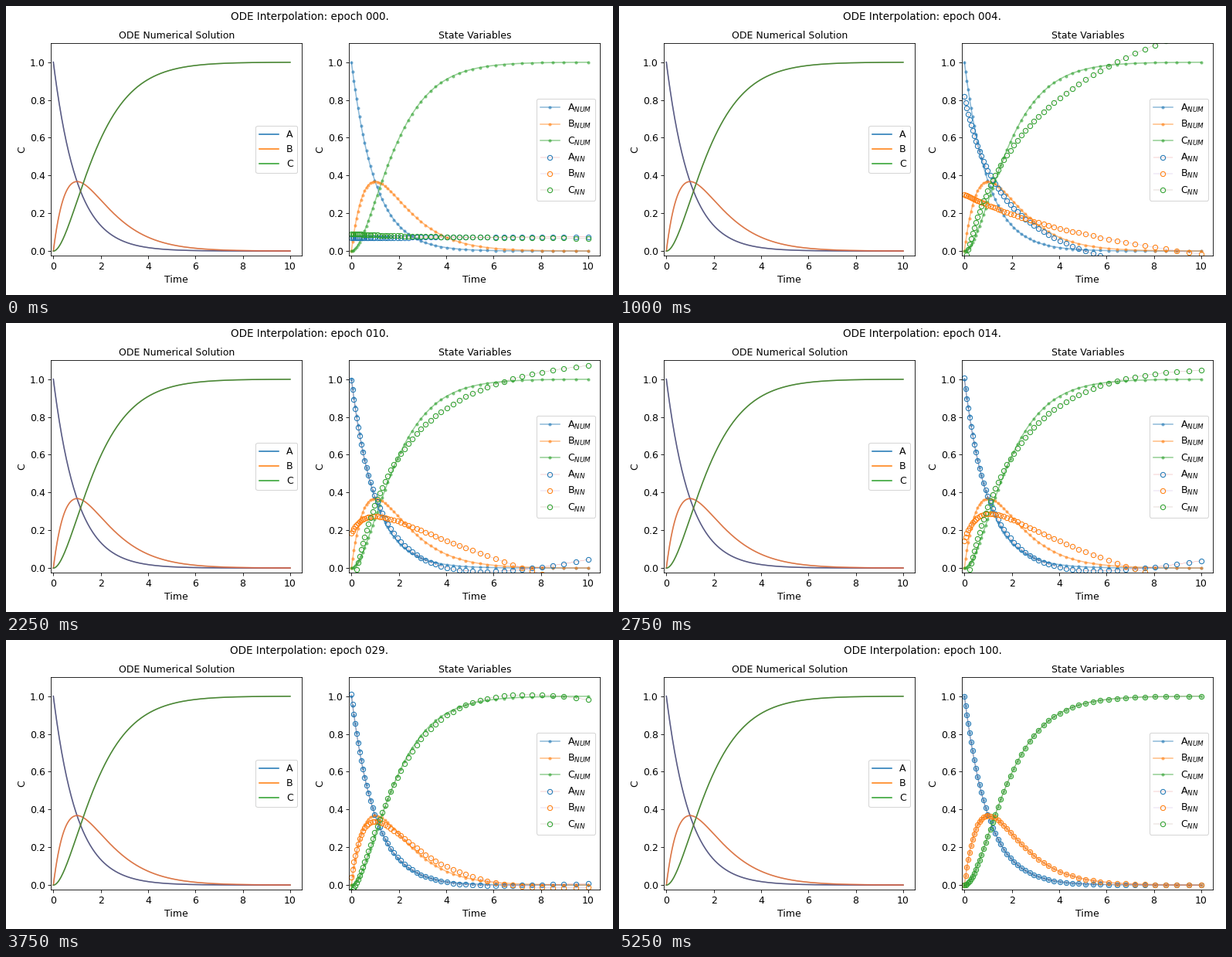
These frames come from a looping animation (786x374 px, 5.5 s). A matplotlib script:

```python
import numpy as np
import matplotlib.pyplot as plt
from matplotlib.animation import FuncAnimation
from numpy.polynomial import legendre

WIDTH, HEIGHT, DPI = 786, 374, 75
NAMES = "ABC"
STEPS = 22
MODES = 10

plt.rcParams.update({"font.family": "DejaVu Sans", "font.size": 12,
                     "axes.titlesize": 12})


def epoch_at(step):
    """One epoch per step at first, then nearly geometric growth."""
    if step <= 7:
        return step
    growth = np.interp(step, [7, 11, 13, 17, 21], np.log([7, 14, 20, 43, 100]))
    return round(np.exp(growth))


def solution(t):
    """Concentrations of the chain A -> B -> C with unit rates."""
    a, b = np.exp(-t), t * np.exp(-t)
    return np.array([a, b, 1 - a - b])


t_fine = np.linspace(0, 10, 400)
t_net = np.geomspace(1, 11, 50) - 1

# The network learns Legendre modes in logarithmic time, coarse ones first.
x_net = np.linspace(-1, 1, len(t_net))
learned = legendre.legfit(x_net, solution(t_net).T, MODES - 1)
initial = np.zeros_like(learned)
initial[:2] = [[0.072, -0.1, 0.08], [0.003, 0, -0.0125]]
delay = np.interp(np.arange(MODES), [0, 1, 2, 3, 4, 9],
                  [1, 1.5, 6.6, 22, 36, 50])
speed = np.array([1.2, 0.87, 1.0])


def network(epoch):
    progress = 1 - np.exp(-(epoch * speed / delay[:, None]) ** 2.5)
    return legendre.legval(x_net, initial + progress * (learned - initial))


fig = plt.figure(figsize=(WIDTH / DPI, HEIGHT / DPI), dpi=DPI)


def add_panel(left, title):
    ax = fig.add_axes([left / WIDTH, 50.75 / HEIGHT,
                       325 / WIDTH, 275 / HEIGHT])
    ax.set(xlim=(-0.1, 10.5), ylim=(-0.025, 1.1), title=title,
           xlabel="Time", ylabel="C")
    return ax


ax_ode = add_panel(58.25, "ODE Numerical Solution")
ax_net = add_panel(444.25, "State Variables")
heading = fig.suptitle("", fontsize=13)

for k, curve in enumerate(solution(t_fine)):
    ax_ode.plot(t_fine, curve, color=f"C{k}", label=NAMES[k])
for k, curve in enumerate(solution(t_fine)):
    ax_ode.plot(t_fine, curve, color=f"C{k + 3}", alpha=0.35)
ax_ode.legend(loc="center right")

for k, curve in enumerate(solution(t_net)):
    ax_net.plot(t_net, curve, ".-", color=f"C{k}", alpha=0.5,
                label=f"{NAMES[k]}$_{{NUM}}$")
net_lines = [ax_net.plot([], [], "o-", color=f"C{k + 3}", lw=0.2, mfc="none",
                         mec=f"C{k}", label=f"{NAMES[k]}$_{{NN}}$")[0]
             for k in range(3)]
ax_net.legend(loc="center right")


def update(step):
    epoch = epoch_at(step)
    heading.set_text(f"ODE Interpolation: epoch {epoch:03d}.")
    for line, curve in zip(net_lines, network(epoch)):
        line.set_data(t_net, curve)
    return [heading, *net_lines]


anim = FuncAnimation(fig, update, frames=STEPS, interval=250,
                     repeat=True, repeat_delay=0)
plt.show()
```
